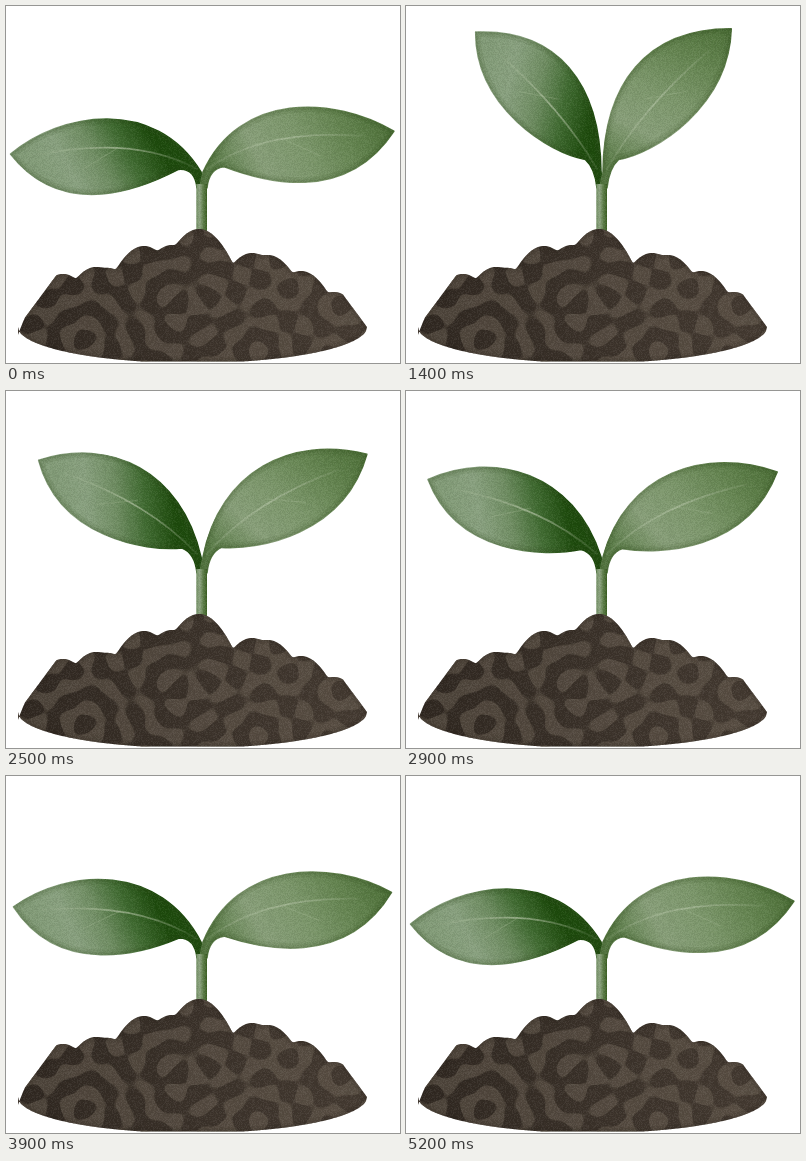
An HTML page with a canvas that plays this animation: 394x357 px, repeating every 5.3 s.

```html
<!DOCTYPE html>
<html>
<head>
<meta charset="utf-8">
<title>Sprout</title>
<style>
html, body { margin: 0; width: 100%; height: 100%; overflow: hidden; background: #fff; }
canvas { display: block; }
</style>
</head>
<body>
<canvas id="stage" width="394" height="357"></canvas>
<script>
const W = 394, H = 357, LOOP = 5300, STEP = 100, OPEN_AT = 1400;
const PIVOT = { x: 196, y: 172 };
const ctx = document.getElementById('stage').getContext('2d');

let seed = 11;
const random = () => (seed = seed * 16807 % 2147483647) / 2147483647;
const clamp = v => Math.max(0, Math.min(1, v));

function gradient([x0, y0], [x1, y1], ...colors) {
  const g = ctx.createLinearGradient(x0, y0, x1, y1);
  colors.forEach((color, i) => g.addColorStop(i / (colors.length - 1), color));
  return g;
}

function stroke(path, style, width) {
  ctx.strokeStyle = style;
  ctx.lineWidth = width;
  ctx.stroke(path);
}

// Darken the inside of a shape towards its edge.
function shadeEdge(path, color, widths) {
  ctx.save();
  ctx.clip(path);
  widths.forEach(w => stroke(path, color, w));
  ctx.restore();
}

// A canvas whose pixels come from shade(x, y) => [r, g, b, alpha].
function makeTexture(shade) {
  const canvas = Object.assign(document.createElement('canvas'), { width: W, height: H });
  const g = canvas.getContext('2d'), image = g.createImageData(W, H);
  for (let i = 0; i < W * H; i++) image.data.set(shade(i % W, Math.floor(i / W)), i * 4);
  g.putImageData(image, 0, 0);
  return canvas;
}

const grain = makeTexture(() => {
  const v = random() < .5 ? 0 : 255;
  return [v, v, v, random() * 16];
});

// Plane waves of one wavelength in random directions add up to winding stripes.
const waves = Array.from({ length: 9 }, (_, i) => {
  const angle = (i + random()) * Math.PI / 9, k = 2 * Math.PI / 26;
  return { kx: k * Math.cos(angle), ky: k * Math.sin(angle), phase: random() * 2 * Math.PI };
});
const stripes = makeTexture((x, y) => {
  const height = waves.reduce((sum, w) => sum + Math.cos(w.kx * x + w.ky * y + w.phase), 0);
  return [112, 102, 88, 115 * clamp((height - .3) * 1.2 + .5)];
});

// The ridge is a soft union of parabolic lumps, cut off by the two slopes of the heap.
const lumps = [[57, 268], [90, 261], [102, 262], [138, 240], [166, 239], [193, 223], [246, 247], [262, 249], [295, 265], [328, 286]];
const LEFT = 12, RIGHT = 361, RIM = 321;
function ridge(x) {
  const sum = lumps.reduce((s, [px, py]) => s + Math.exp((RIM - py - .03 * (x - px) ** 2) / 1.5), 0);
  return Math.max(RIM - 1.5 * Math.log(sum), RIM - 1.35 * Math.min(x - LEFT, RIGHT - x));
}
function underside(x) {
  const u = 2 * (x - LEFT) / (RIGHT - LEFT) - 1;
  return Math.min(355.5, RIM + 36 * Math.sqrt(1 - u * u));
}
const soil = new Path2D();
for (let x = LEFT; x <= RIGHT; x++) soil.lineTo(x, ridge(x));
for (let x = RIGHT; x >= LEFT; x--) soil.lineTo(x, underside(x));
soil.closePath();

const leaves = [
  { side: -1, length: 193, droop: 42, duration: 3500, shade: [60, -30, 150, 15], colors: ['#1d4a0c', '#3f6a30', '#6f8d62', '#88a07e', '#829b77'] },
  { side: 1, length: 197.5, droop: 35.4, duration: 3200, shade: [20, 20, 190, -10], colors: ['#587a45', '#879e78', '#7b966a', '#648450', '#4d7038'] }
];

function drawLeaf({ side, length, droop, duration, shade, colors }, t) {
  const u = t < OPEN_AT ? 1 : clamp((t - OPEN_AT) / duration);
  const p = Math.sin(Math.PI / 2 * u ** 1.15);
  const angle = 40.9 + droop * p;
  // Polar point around the pivot; the offset in degrees is counted from the tip.
  const at = (r, offset) => {
    const a = (angle + offset) * Math.PI / 180;
    return [PIVOT.x + side * r * Math.sin(a), PIVOT.y - r * Math.cos(a)];
  };
  const tip = at(length, 0);

  const blade = new Path2D();
  blade.moveTo(PIVOT.x - side * 2, 182);
  blade.lineTo(PIVOT.x + side, 166);
  blade.bezierCurveTo(...at(94, -40 - 13 * p), ...at(156, -24.5 + 6.5 * p), ...tip);
  blade.bezierCurveTo(...at(145, 20 + 5 * p), ...at(58, 24 - 8 * p), ...at(25, 1 - 14 * p));
  blade.quadraticCurveTo(PIVOT.x + side * 7, 162, PIVOT.x + side * 5, 182);
  blade.closePath();
  const [r0, o0, r1, o1] = shade;
  ctx.fillStyle = gradient(at(r0, o0), at(r1, o1), ...colors);
  ctx.fill(blade);
  stroke(blade, ctx.fillStyle, 1.5);
  shadeEdge(blade, 'rgba(40,75,20,.1)', [2, 5, 10]);

  const midrib = new Path2D();
  midrib.moveTo(PIVOT.x + side * 5, 163);
  midrib.quadraticCurveTo(...at(80, -11 - 14 * p), ...at(165, -1));
  stroke(midrib, gradient(at(15, 0), at(165, 0), 'rgba(170,188,155,.15)', 'rgba(170,188,155,.75)', 'rgba(170,188,155,.1)'), 1.8);
  const branch = new Path2D();
  branch.moveTo(...at(90, -12));
  branch.lineTo(...at(120, 3));
  stroke(branch, 'rgba(165,184,150,.3)', 1.2);
}

function drawStem() {
  ctx.fillStyle = gradient([190, 0], [201, 0], '#6d8b5d', '#8fa583', '#5d7d48', '#385d20');
  ctx.fillRect(190.3, 178, 10.7, 60);
}

function drawSoil() {
  ctx.fillStyle = gradient([LEFT, 0], [RIGHT, 0], '#2f2720', '#3a3129', '#443a31');
  ctx.fill(soil);
  ctx.save();
  ctx.clip(soil);
  ctx.drawImage(stripes, 0, 0);
  ctx.restore();
  shadeEdge(soil, 'rgba(40,32,25,.12)', [4, 9]);
}

function draw(now) {
  const t = Math.floor(now % LOOP / STEP) * STEP;
  ctx.clearRect(0, 0, W, H);
  ctx.lineCap = ctx.lineJoin = 'round';
  leaves.forEach(leaf => drawLeaf(leaf, t));
  drawStem();
  drawSoil();
  ctx.globalCompositeOperation = 'source-atop';
  ctx.drawImage(grain, 0, 0);
  ctx.globalCompositeOperation = 'source-over';
  requestAnimationFrame(() => draw(performance.now() - start));
}

const start = performance.now();
draw(0);
</script>
</body>
</html>
```
